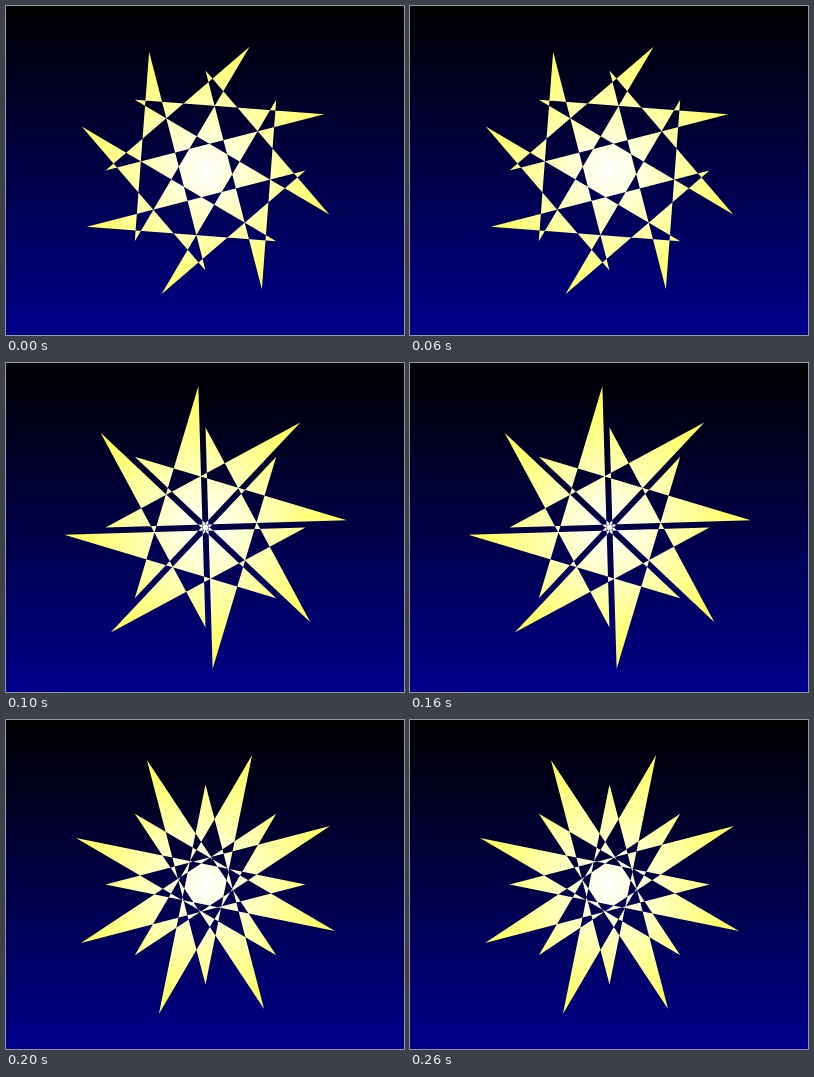
Recreate the animation shown at these times as an HTML page. Size 398x329 px, loop 300 ms.

```html
<!DOCTYPE html>
<html lang="en">
<head>
<meta charset="utf-8">
<title>Turning star</title>
<style>
  html, body { margin: 0; width: 100%; height: 100%; overflow: hidden; background: #000; }
  svg { display: block; width: 398px; height: 329px; }
</style>
</head>
<body>
<svg viewBox="0 0 398 329">
  <defs>
    <linearGradient id="sky" x1="0" y1="0" x2="0" y2="1">
      <stop offset="0" stop-color="#000"/>
      <stop offset="1" stop-color="#00008b"/>
    </linearGradient>
    <radialGradient id="glow" gradientUnits="userSpaceOnUse" cx="199.5" cy="164.5" r="140">
      <stop offset="0" stop-color="#fff"/>
      <stop offset="1" stop-color="#ffff50"/>
    </radialGradient>
  </defs>
  <rect width="398" height="329" fill="url(#sky)"/>
  <g id="stars" fill="url(#glow)" fill-rule="evenodd"></g>
</svg>
<script>
  const CX = 199.5, CY = 164.5, INNER = 100, POINTS = 8, STEP = 100;

  // Outer ring: turn in degrees against the fixed inner ring, and radius.
  const poses = [
    { turn: 109.6, radius: 131.4 },
    { turn: 132.1, radius: 141.4 },
    { turn: 154.8, radius: 137.6 }
  ];

  // Angles run clockwise from straight up.
  function polar(deg, r) {
    const a = deg * Math.PI / 180;
    return `${(CX + r * Math.sin(a)).toFixed(2)},${(CY - r * Math.cos(a)).toFixed(2)}`;
  }

  // One closed line that alternates between the two rings.
  function starPoints({ turn, radius }) {
    const pts = [];
    for (let j = 0; j < POINTS; j++) {
      const deg = -j * 360 / POINTS;
      pts.push(polar(deg, INNER), polar(deg + turn, radius));
    }
    return pts.join(' ');
  }

  const group = document.getElementById('stars');
  const loop = poses.length * STEP;

  poses.forEach((pose, i) => {
    const star = document.createElementNS('http://www.w3.org/2000/svg', 'polygon');
    star.setAttribute('points', starPoints(pose));
    group.append(star);
    star.animate([
      { opacity: 1, offset: 0, easing: 'step-end' },
      { opacity: 0, offset: 1 / poses.length, easing: 'step-end' },
      { opacity: 0, offset: 1 }
    ], { duration: loop, iterations: Infinity, delay: i * STEP - loop });
  });
</script>
</body>
</html>
```
